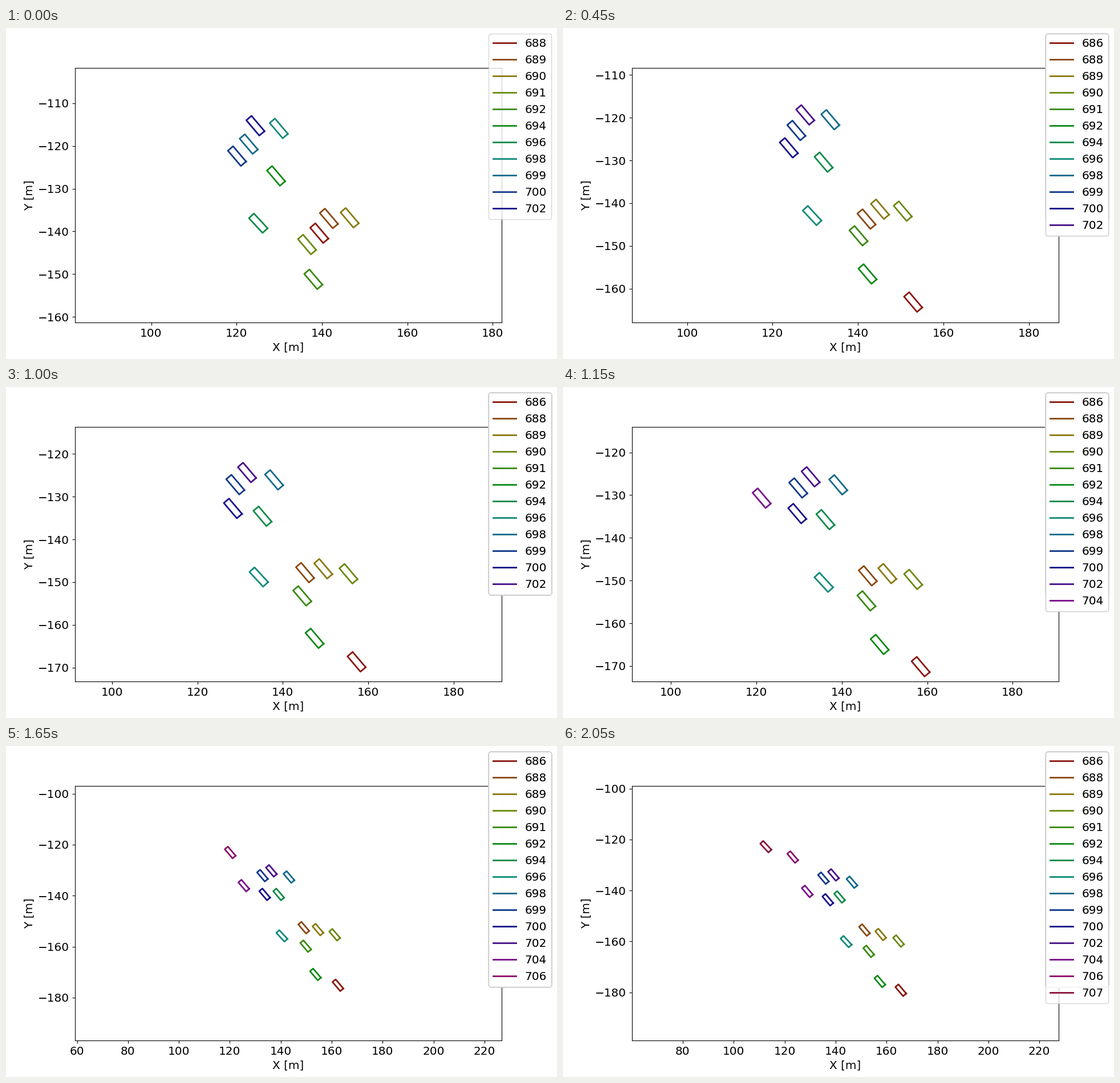
Write a matplotlib script that moves like this. It is 966 px wide and 580 px high and loops after 2100 ms.

```python
import colorsys
from itertools import starmap
from math import atan2, cos, degrees, radians, sin

import matplotlib.pyplot as plt
import numpy as np
from matplotlib.animation import FuncAnimation
from matplotlib.lines import Line2D

FRAMES, INTERVAL = 42, 50
SPAN = 100                # metres
WIDE_FROM = 30            # from here the span applies to the height
LAYERS = 12               # legends pile up, older ones are fully covered
LENGTH, WIDTH = 4.7, 1.6  # vehicle size in metres

# A straight road with parallel lanes.
COURSE, YAW = -51.6, 2    # driving direction, and how far the boxes turn from it
LANE_0, LANE_STEP = 14.2, 3.9


def unit(angle):
    a = radians(angle)
    return np.array([cos(a), sin(a)])


AHEAD, ACROSS = unit(COURSE), unit(COURSE + 90)


class Car:
    """Drives at constant speed; drift is in lanes per frame."""

    def __init__(self, name, lane, start, speed, enters=0, drift=0):
        self.name, self.lane, self.start = name, lane, start
        self.speed, self.enters, self.drift = speed, enters, drift
        self.heading = COURSE + YAW + degrees(atan2(drift * LANE_STEP, speed))

    def center(self, n):
        offset = LANE_0 + LANE_STEP * (self.lane + self.drift * n)
        return AHEAD * (self.start + self.speed * n) + ACROSS * offset

    def outline(self, n):
        along = unit(self.heading) * LENGTH / 2
        side = unit(self.heading + 90) * WIDTH / 2
        signs = [(1, 1), (1, -1), (-1, -1), (-1, 1), (1, 1)]
        return np.transpose([self.center(n) + i * along + j * side for i, j in signs])


CARS = list(starmap(Car, [
    (686, 1.1, 217.1, 0.638, 7),
    (688, 2, 196.6, 0.470),
    (689, 3, 195.3, 0.632),
    (690, 4, 198.2, 0.716),
    (691, 1, 196.9, 0.648),
    (692, 0, 204.2, 0.762),
    (694, 2.1, 179.8, 0.484),
    (696, -0.5, 185.9, 0.709, 0, 0.008),
    (698, 4, 171.5, 0.649),
    (699, 2, 170.0, 0.486),
    (700, 1, 170.5, 0.662),
    (702, 3, 167.6, 0.580),
    (704, -0.1, 162.0, 0.684, 21),
    (706, 0.9, 151.0, 0.608, 25),
    (707, -0.9, 137.5, 0.700, 41, 0.008),
]))
COLORS = [colorsys.hls_to_rgb(0.01 + i / len(CARS), 0.3, 0.8)
          for i in range(len(CARS))]


def active(n):
    return [car for car in CARS if n >= car.enters]


plt.rcParams.update({"font.family": "DejaVu Sans", "font.size": 14.4})
fig, ax = plt.subplots(figsize=(9.66, 5.8), dpi=100)
ax.set_xlabel("X [m]")
ax.set_ylabel("Y [m]")
boxes = [ax.plot([], [], color=c, lw=2)[0] for c in COLORS]
RATIO = ax.bbox.height / ax.bbox.width


def make_legend(n):
    cars = active(n)
    handles = [Line2D([], [], color=c, lw=2) for c in COLORS[:len(cars)]]
    return fig.legend(handles, [str(car.name) for car in cars], loc="upper right")


legends = [make_legend(n) for n in range(FRAMES)]


def update(n):
    cars = active(n)
    for line in boxes:
        line.set_data([], [])
    for line, car in zip(boxes, cars):
        line.set_data(*car.outline(n))

    # The view follows the mean position of all cars.
    x, y = np.mean([car.center(n) for car in cars], axis=0)
    w = SPAN / RATIO if n >= WIDE_FROM else SPAN
    ax.set_xlim(x - w / 2, x + w / 2)
    ax.set_ylim(y - w * RATIO / 2, y + w * RATIO / 2)

    for i, legend in enumerate(legends):
        legend.set_visible(n - LAYERS < i <= n)
    return boxes


anim = FuncAnimation(fig, update, frames=FRAMES, interval=INTERVAL,
                     init_func=lambda: boxes, repeat=True, repeat_delay=0)
plt.show()
```
